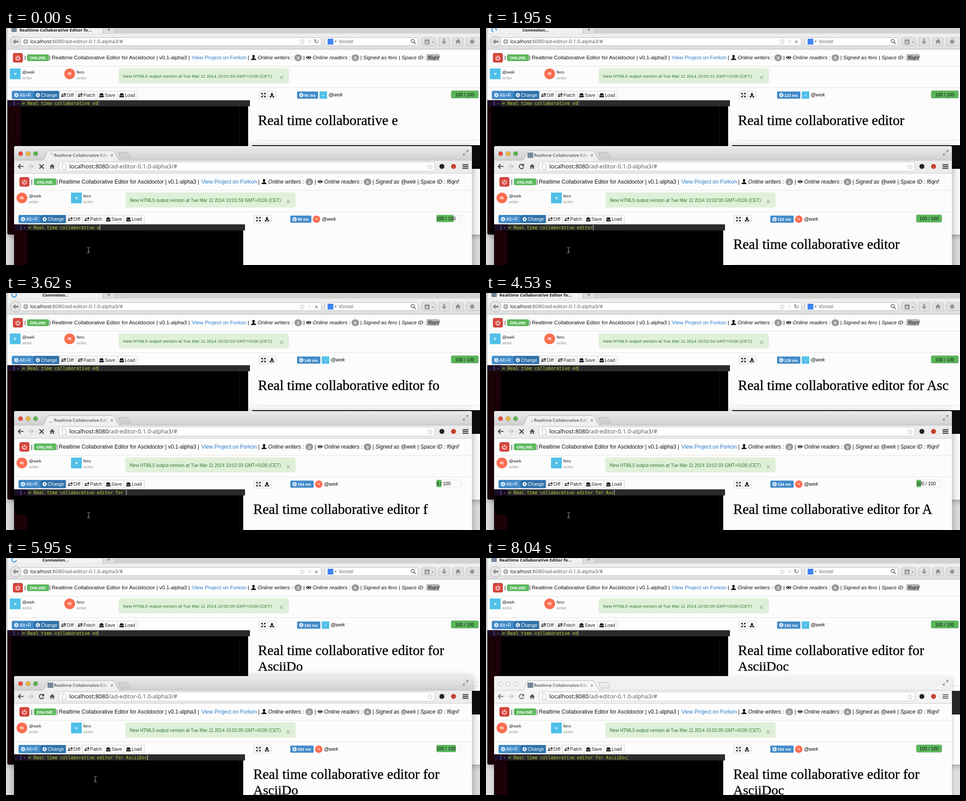
An HTML page for the animation above (8.93 s loop, 1057 px wide and 530 px high).

```html
<!DOCTYPE html>
<html lang="en">
<head>
<meta charset="utf-8">
<title>Collaborative editor</title>
<style>
html, body { margin: 0; width: 100%; height: 100%; overflow: hidden; background: #dedede; }
svg { display: block; }
text { font-family: "Liberation Sans", Arial, sans-serif; white-space: pre; }
.b { font-weight: bold; }
.i { font-style: italic; }
.c { text-anchor: middle; }
.u { font-family: "Open Sans", sans-serif; }
.m { font-family: "DejaVu Sans Mono", monospace; }
.d { font-family: "DejaVu Sans", sans-serif; text-anchor: middle; }
.s { font-family: "Liberation Serif", serif; stroke: #000; stroke-width: .4px; }
</style>
</head>
<body>
<svg width="1057" height="530" viewBox="0 0 1057 530"></svg>
<script>
const LOOP = 8930;
const LINE = '= Real time collaborative editor for AsciiDoc';
const USER = '@wek', PEER = 'fero';
const BLUE = '#428bca', GREEN = '#5cb85c', SKY = '#4fc0e8', CORAL = '#fc6e51', INK = '#111';
const svg = document.querySelector('svg');

// Moments at which one more character appears.
const TYPED = [150, 450, 660, 890, 1120, 2700, 2910, 3060, 3320, 3620, 4050, 4280, 4530, 4830, 5030, 5330, 5660, 5950];
const SHOWN = [450, 660, 890, 1120, 1350, 2700, 3060, 3320, 3820, 4050, 4050, 4280, 4530, 4830, 5030, 5660, 5950, 6240];
const count = (t, times) => 27 + times.filter(x => x <= t).length;

// Step track written as "time:value time:value".
const at = (t, track) => {
  let value;
  for (const step of track.split(' ')) {
    const [time, v] = step.split(':').map(Number);
    if (t >= time) value = v;
  }
  return value;
};

const rect = (x, y, w, h, fill, rx = 0, stroke = 'none') =>
  `<rect x="${x}" y="${y}" width="${w}" height="${h}" fill="${fill}" rx="${rx}" stroke="${stroke}"/>`;
const text = (x, y, str, size, fill = INK, cls = '') =>
  `<text x="${x}" y="${y}" font-size="${size}" fill="${fill}" class="${cls}">${str}</text>`;
const disc = (x, y, r, fill, stroke = 'none', w = 1) =>
  `<circle cx="${x}" cy="${y}" r="${r}" fill="${fill}" stroke="${stroke}" stroke-width="${w}"/>`;
const line = (d, stroke = INK, w = 1.5) => `<path d="${d}" fill="none" stroke="${stroke}" stroke-width="${w}"/>`;
const shape = (d, fill = INK, stroke = 'none') => `<path d="${d}" fill="${fill}" stroke="${stroke}"/>`;
const group = (x, y, body) => `<g transform="translate(${x} ${y})">${body}</g>`;

const icons = {
  gear: disc(0, 0, 2.8, 'none', '#fff', 2) +
    '<circle r="4.2" fill="none" stroke="#fff" stroke-width="1.7" stroke-dasharray="1.65"/>',
  swap: line('M-5 -2H3M5 2H-3', INK, 1.3) + shape('M2 -5L6 -2L2 .5ZM-2 5L-6 2L-2 -.5Z'),
  disk: shape('M-3 -4H3L5 1H-5ZM-5 2H5V5H-5Z'),
  expand: line('M-4 -4L4 4M4 -4L-4 4', INK, 1.3) +
    shape('M-5 -5h4l-4 4ZM5 -5v4l-4 -4ZM-5 5v-4l4 4ZM5 5h-4l4 -4Z') + rect(-1.5, -1.5, 3, 3, '#fff'),
  load: shape('M-1.5 -5H1.5V-1H4L0 3L-4 -1H-1.5ZM-5 2H-3L-1 4H1L3 2H5V5H-5Z'),
  power: line('M-2.6 -3A4.2 4.2 0 1 0 2.6 -3M0 -5.5V0', '#fff', 1.6),
  user: disc(0, -3, 2.8, INK) + shape('M-1.5 -1H1.5V1.5L5.5 3.5V5.5H-5.5V3.5L-1.5 1.5Z'),
  eye: shape('M-6 0Q0 -7.5 6 0Q0 7.5 -6 0Z') + disc(0, -.4, 2.9, '#fff') + disc(0, -.4, 1.9, INK),
  home: shape('M-6 0L0 -6L6 0H4V5H1.3V1.5H-1.3V5H-4V0Z', '#555')
};
const icon = (name, x, y) => group(x, y, icons[name]);

function avatar(x, y, r, round, size) {
  return (round ? disc(x, y, r, CORAL) : rect(x - r, y - r, 2 * r, 2 * r, SKY)) +
    text(x, y + size * .37, round ? 'ME' : 'W', size, '#fff', 'b m c');
}

function header(p) {
  const X = x => p.head + (x - 102) * p.k;
  const size = 11.8 * p.k;
  const say = (x, str, cls = '', fill = INK) => text(X(x), 70, str, size, fill, cls);
  const badge = (x, n) => rect(X(x) - 8.5, 59, 17, 15, '#999', 7.5) + text(X(x), 70, n, 9.5, '#fff', 'b c');
  return rect(X(16), 56.5, 21, 20, '#d9483f', 3, '#b52b27') + icon('power', X(16) + 10.5, 67) +
    say(41, '|') + rect(X(47), 59, 49 * p.k, 15, GREEN, 3) + text(X(53), 70, 'ONLINE.', 9.3 * p.k, '#fff', 'b') +
    say(96.5, '|') + say(102, 'Realtime Collaborative Editor for Asciidoctor | v0.1-alpha3 |') +
    say(414.5, 'View Project on Forkon', '', '#2a7cc8') + say(539, '|') +
    icon('user', X(552), 66) + say(561, 'Online writers :', 'i') + badge(651.5, 2) + say(663, '|') +
    icon('eye', X(675), 66) + say(684, 'Online readers :', 'i') + badge(779, 0) +
    (p.marked ? rect(938, 58.5, 28, 14.5, '#b4b4b4') : '') +
    say(790, `| Signed as ${p.me} | Space ID : f6qnf`, 'i');
}

function people(p) {
  const person = (x, name, round) => avatar(x + 12, 102.5, 12, round, 7.5) +
    text(x + 27.5, 101.5, name, 9.9, '#222') + text(x + 27.5, 114.5, 'writer', 9, '#999');
  const stamp = p.sec < 0 ? '01:59' : '02:0' + p.sec;
  return group(p.left, 0, person(8.5, USER, p.swapped) + person(130, PEER, !p.swapped) +
    rect(252, 91, 378, 32, '#dff0d8', 3, '#d9ecd0') +
    text(261, 111, `New HTML5 output version at Tue Mar 11 2014 10:${stamp} GMT+0100 (CET)`, 9.93 * p.k, '#2f7532') +
    text(614.5, 116, '×', 16, '#a9b8a4', 'b c'));
}

function toolbar(p) {
  const button = (x, w, label, name, fill = '#fff') => {
    const plain = fill === '#fff';
    return rect(x + .5, 141, w, 17.5, fill, 2, plain ? '#ccc' : '#357ebd') + icon(name, x + 10, 150) +
      (label && text(x + 17, 153.5, label, 10.4, plain ? '#222' : '#fff'));
  };
  const wide = p.ms > 99 ? 52 : 47;
  const fill = p.bar[1] * p.fill;
  const label = p.pct + ' / 100';
  const labelX = p.bar[0] + Math.max(0, (fill - (p.pct ? 43 : 31)) / 2);
  return group(p.left, 0,
      button(13, 48, 'Alt+R', 'gear', BLUE) + button(61, 57, 'Change', 'gear', '#3071a9') +
      button(118.5, 37, 'Diff', 'swap') + button(155.5, 48, 'Patch', 'swap') +
      button(203, 45, 'Save', 'disk') + button(248, 45, 'Load', 'disk')) +
    group(p.view, 0, button(564, 19, '', 'expand') + button(583, 19, '', 'load')) +
    group(p.msX, 0, rect(0, 142, wide, 16, BLUE, 2) + icon('gear', 9.5, 150) +
      text(16, 153.5, p.ms + ' ms', 9, '#fff', 'b') +
      avatar(wide + 11.5, 150, 8.3, p.swapped, 4.5) + text(wide + 23, 153, USER, 11.4, INK, 'i')) +
    rect(p.bar[0], 140.5, p.bar[1], 16, '#fafafa', 3, '#e6e6e6') +
    rect(p.bar[0], 140.5, fill, 16, GREEN, 2, p.fill === 1 ? '#4a9a4a' : 'none') +
    text(labelX, 152.5, label, 10.3, '#111');
}

function preview(p) {
  const wrapped = p.shown >= p.wrapAt;
  const first = wrapped ? LINE.slice(2, 36) : LINE.slice(2, p.shown);
  const x = p.headingX;
  return text(x, 216.7, first, 31.15, '#000', 's') +
    (wrapped ? text(x, 251.7, LINE.slice(37, p.shown), 30, '#000', 's') : '') +
    (p.shown ? rect(x, wrapped ? 286 : 251, p.ruleW, 1, '#ddd') : '');
}

function editor(p) {
  const { x, w, cell, margin } = p.ed;
  const end = p.ed.text + p.typed * cell;
  return rect(x, 162, w, 310, '#000') + p.gutter + rect(margin, 175, 1, 297, '#141414') +
    rect(x, 161.5, w + 4, 13.5, '#2b2b2d') + rect(x, 161.5, 30, 13.5, '#1c0d26') +
    text(x + 12, 172, '1', 10, '#5f74d8', 'm') + text(x + 24, 171, '▾', 6, '#776', 'd') +
    text(p.ed.text, 172, LINE.slice(0, p.typed), cell / .602, '#b9cf35', 'm') +
    (p.caret ? rect(end, 162.5, 1.2, 12, p.caret) : '');
}

function page(p) {
  const rule = y => rect(p.ed.x, y, p.w, 1, '#e3e3e3');
  return group(0, p.y, rule(85) + rule(133) + header(p) + people(p) + toolbar(p) + editor(p) + preview(p));
}

const address = (x, y, size, host, rest) =>
  `<text x="${x}" y="${y}" font-size="${size}" class="u" fill="#505050"><tspan fill="#000">${host}</tspan>${rest}</text>`;

function backChrome(busy, t) {
  const button = (x, w, body) => rect(x, 21.5, w, 18, '#e2e2e2', 3, '#bdbdbd') + group(x + w / 2, 30.5, body);
  const turn = t / 3 % 360;
  return rect(3, 0, 1054, 13, '#d2d2d2') + shape('M3 0H216V9Q216 13 222 13H3Z', '#f1f1f1', '#bbb') +
    rect(216, 0, 27, 12, '#dedede', 0, '#bbb') + text(229, 8, '+', 14, '#666', 'c') +
    rect(3, 12.5, 1054, 35, 'url(#bar)') + rect(3, 47, 1054, 1, '#b5b5b5') +
    (busy
      ? `<g transform="translate(18 4) rotate(${turn})">${line('M-5 0A5 5 0 1 1 0 5', '#3d9ee8', 2.4)}</g>` +
        text(81, 8, 'Connexion...', 9.6, '#111', 'b u')
      : rect(12, 0, 12, 9, '#76879a') + text(30, 8, 'Realtime Collaborative Editor fo...', 9.6, '#111', 'b u')) +
    rect(30, 21.5, 673, 18, '#fff', 3, '#bcbcbc') + disc(21.5, 30.5, 12, '#e6e6e6', '#aaa') +
    shape('M15 30.5L21 25V28.5H28V32.5H21V36Z', '#888') +
    disc(44, 30.5, 5, '#aaa', '#777') + line('M39 30.5H49M44 25.5Q40 30.5 44 35.5Q48 30.5 44 25.5', '#eee', .8) +
    address(54, 34.3, 11.2, 'localhost', ':8080/ad-editor-0.1.0-alpha3/#') +
    text(660, 36, '☆', 17, '#999', 'd') + text(677, 34, '▽', 9, '#aaa', 'd') +
    text(692, 35, busy ? '✕' : '↻', busy ? 11 : 14, '#666', 'd') +
    rect(711.5, 21.5, 207, 18, '#fff', 3, '#bcbcbc') + rect(717, 24, 13, 13, '#4285f4') +
    text(735, 33, '▾', 9, '#777', 'd') + text(742, 34.3, 'Vonzel', 10.5, '#555', 'u') +
    disc(907, 29, 3.6, 'none', '#666', 1.6) + line('M909.5 31.5L913.5 35.5', '#666', 2) +
    button(927.5, 30, rect(-9, -5, 11, 11, '#999', 1) + text(-3.5, 4, '★', 9, '#eee', 'd') + text(9, 3, '▾', 8, '#999', 'd')) +
    button(965.5, 23, shape('M-2 -6H2V0H6L0 6L-6 0H-2Z', '#999')) +
    button(996.5, 23, `<g opacity=".6">${icons.home}</g>`) + button(1027.5, 30, disc(-3, 0, 5, '#999'));
}

function frontChrome(busy, dim, t) {
  const lamp = (x, fill) => disc(x, 281, 4.8, dim ? '#f6f6f6' : fill, dim ? '#bbb' : 'rgba(0,0,0,.3)');
  const dark = dim ? '#777' : '#444';
  const turn = t / 3 % 360;
  return shape('M18 296V268Q18 264 22 264H1035Q1039 264 1039 268V296Z', dim ? '#f1f1f1' : 'url(#title)') +
    lamp(32.5, '#ee4b40') + lamp(49.5, '#f3b63b') + lamp(66, '#54bd45') +
    shape('M251 278H269Q272 278 273 281L277 291H259Q255 291 254 288Z', dim ? '#ececec' : '#d2d2d2', '#b4b4b4') +
    rect(18, 296, 1021, 29, dim ? '#f4f4f4' : '#ececec') + rect(18, 295.5, 1021, .8, '#b9b9b9') +
    shape('M78 296.5Q84 296 87 289L91 278Q93 274 98 274H235Q240 274 242 278L249 291Q251 296 258 296.5Z', dim ? '#f7f7f7' : '#f0f0f0') +
    line('M78 296Q84 296 87 289L91 278Q93 274 98 274H235Q240 274 242 278L249 291Q251 296 258 296', '#b0b0b0', 1) +
    (busy
      ? `<g transform="translate(98.5 284.5) rotate(${turn})">${line('M0 -5A5 5 0 0 1 5 0', '#9bb3d8', 1.6)}</g>`
      : rect(92.5, 278.5, 13, 12, '#76879a')) +
    text(107, 288, 'Realtime Collaborative Edit', 9.65, 'url(#fade)', 'u') + text(236, 288, '✕', 8.5, '#555', 'd') +
    line('M1020 284L1024 280M1026 278L1030 274', '#888', 1.3) + shape('M1019 285v-5l5 5ZM1031 273v5l-5 -5Z', '#888') +
    line('M39 309.5H27.5M32.5 304.5L27.5 309.5L32.5 314.5', dark, 2.2) +
    line('M49 309.5H60.5M55.5 304.5L60.5 309.5L55.5 314.5', '#c4c4c4', 2.2) +
    (busy ? line('M74.5 305L84 314.5M84 305L74.5 314.5', dark, 2.4)
      : line('M83 306.5A5 5 0 1 0 84 311', dark, 2) + shape('M85 303V309H79Z', dark)) +
    icon('home', 103, 310) +
    rect(118.5, 299.5, 838, 20.5, '#fff', 3, '#c2c2c2') + shape('M125.5 303.5H131L134.5 307V316.5H125.5Z', '#fff', '#aaa') +
    address(141, 314, 13.05, 'localhost:8080', '/ad-editor-0.1.0-alpha3/#') +
    text(945, 315.5, '☆', 17, '#999', 'd') + disc(972, 309.5, 5.5, '#222') + disc(998, 309.5, 5.5, '#c8402f') +
    [304.5, 308.5, 312.5].map(y => rect(1018, y, 13, 2.4, dark)).join('') + rect(18, 324.5, 1021, 1, '#c6c6c6');
}

const DEFS = `<defs>
<linearGradient id="bar" x2="0" y2="1"><stop stop-color="#f0f0f0"/><stop offset="1" stop-color="#dedede"/></linearGradient>
<linearGradient id="title" x2="0" y2="1"><stop stop-color="#ebebeb"/><stop offset="1" stop-color="#cfcfcf"/></linearGradient>
<linearGradient id="fade" gradientUnits="userSpaceOnUse" x1="208" x2="231"><stop stop-color="#222"/><stop offset="1" stop-color="#222" stop-opacity="0"/></linearGradient>
<clipPath id="win"><rect x="3" y="-9" width="1070" height="471" rx="4"/></clipPath>
</defs>`;

function scene(t) {
  const dim = t >= 8040;
  const busyBack = !!at(t, '0:0 450:1 4280:0 4830:1 6440:0');
  const busyFront = !!at(t, '0:1 1350:0 3320:1 5660:0');
  const gutter = at(t, '0:1 450:0 1350:1 3320:2 4830:0 6440:1');
  const shown = count(t, SHOWN);
  const maroon = '#1b0207';

  const back = {
    y: 0, k: 1, head: 102, left: 0, view: 0, w: 1054, me: PEER, marked: true, swapped: false,
    sec: at(t, '0:-1 660:0 1560:1 2700:2 3320:3 4280:4 5660:5'),
    ms: at(t, '0:95 890:122 2700:274 3320:149 4280:128 5660:192'),
    msX: 649, bar: [993, 60], fill: 1, pct: 100,
    shown, wrapAt: 43, headingX: 562, ruleW: 491,
    ed: { x: 3, w: 537, text: 36, cell: 6.05, margin: 520 }, typed: 28, caret: '#777',
    gutter: rect(3, 175, busyBack ? 9 : 30, 287, maroon)
  };
  const front = {
    y: 277.6, k: 1.0165, head: 118, left: 15, view: -11, w: 1021, me: USER, marked: false, swapped: true,
    sec: at(t, '0:-1 660:0 3320:3 5660:5'),
    ms: at(t, '0:95 890:147 1350:122 3320:154 4280:134 5660:282 6240:192'),
    msX: 634, bar: [960, 56],
    fill: at(t, '0:68 150:88 450:30 660:50 890:70 1120:85 1350:60 1560:85 1750:95 1950:100 2700:60 2910:36 3060:15 ' +
      '3320:5 3620:20 3820:45 4050:30 4280:8 4530:18 4830:50 5030:75 5330:30 5660:50 5950:77 6240:90 6440:97 6690:100') / 100,
    pct: at(t, '0:100 2700:0 4050:100'),
    shown: at(t, '0:0 1350:32 3620:34 3820:35 4050:36 4530:38 4830:39 5330:42 5660:43 5950:44 6240:45'),
    wrapAt: 40, headingX: 551.5, ruleW: 465,
    ed: { x: 18, w: 511, text: 50, cell: 5.89, margin: 521 }, typed: count(t, TYPED),
    caret: at(t, '0:1 1560:0 1950:1 7290:0 7590:1') ? (dim ? '#666' : '#ccc') : '',
    gutter: gutter ? rect(18, gutter === 2 ? 217.4 : 175, 29, 120, maroon) : ''
  };

  const shadow = (blur, alpha, body) => `<g style="filter:drop-shadow(0 4px ${blur}px rgba(0,0,0,${alpha}))">${body}</g>`;
  const beamX = t < 5950 ? 184 : 199, beamY = t < 5950 ? 497 : 495;
  return DEFS + rect(0, 0, 1057, 530, '#dedede') +
    shadow(6, .25, rect(3, -9, 1070, 471, '#fcfcfc', 4)) +
    `<g clip-path="url(#win)">` +
    page(back) + rect(549, shown >= 43 ? 297 : 262, 508, 53, dim ? '#262626' : '#0c0c0c') + '</g>' +
    backChrome(busyBack, t) +
    shadow(dim ? 4 : 9, dim ? .22 : .35, rect(18, 264, 1021, 291, '#fcfcfc', 4)) +
    frontChrome(busyFront, dim, t) + page(front) +
    (dim ? '' : group(beamX, beamY, line('M-3.5 -6.5Q0 -6.5 0 -4Q0 -6.5 3.5 -6.5M0 -5V5M-3.5 6.5Q0 6.5 0 4Q0 6.5 3.5 6.5M-2 2H2', '#8a8a8a', 1.2)));
}

// The picture only changes at these moments.
const STEPS = [...new Set([0, ...TYPED, ...SHOWN, 1560, 1750, 1950, 6440, 6690, 7290, 7590, 8040])].sort((a, b) => a - b);
let last = -1;
function frame(now) {
  const t = now % LOOP;
  const step = STEPS.filter(s => s <= t).pop();
  if (step !== last) svg.innerHTML = scene(last = step);
  requestAnimationFrame(frame);
}
frame(0);
</script>
</body>
</html>
```
